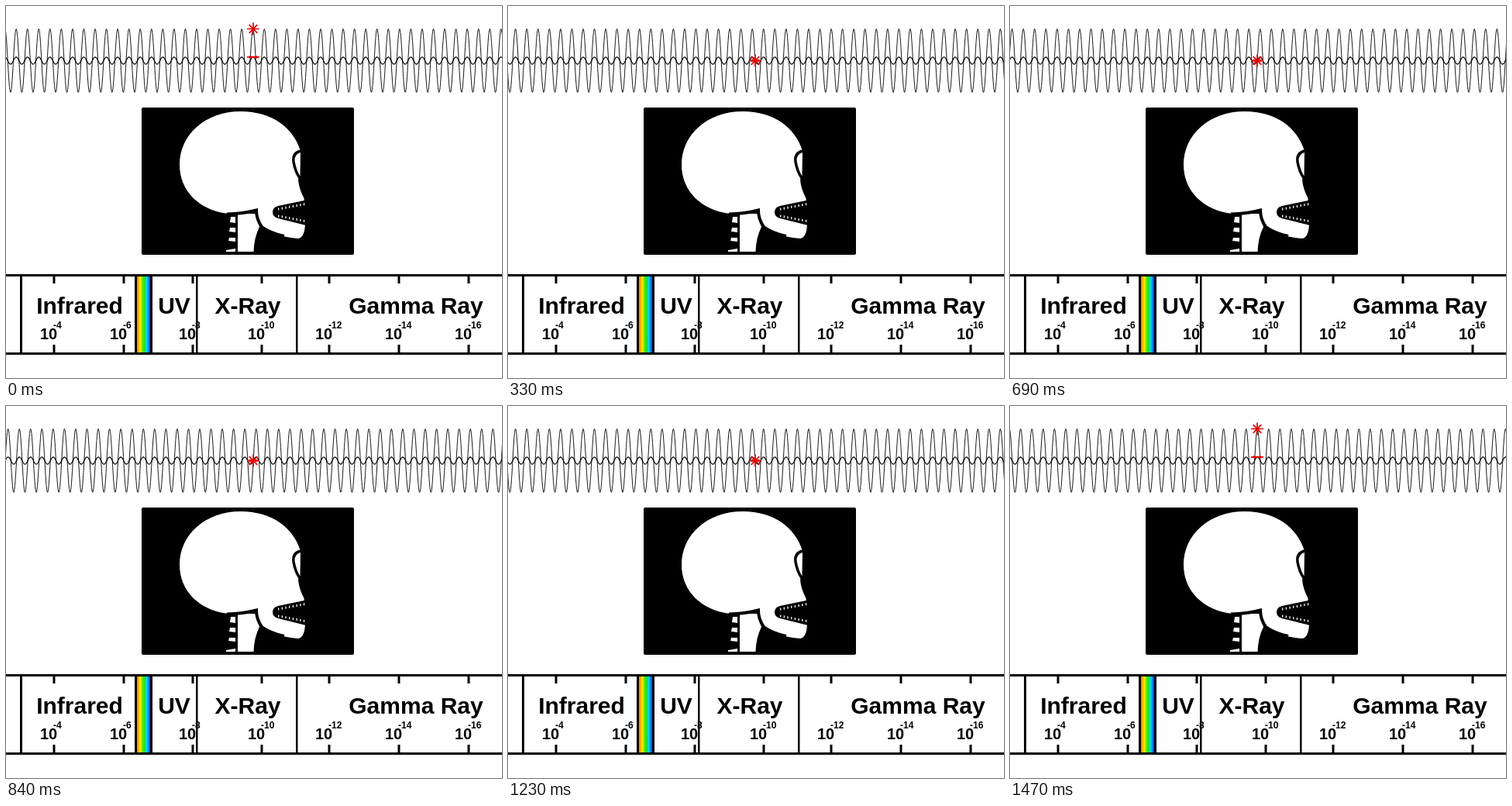
An HTML page with a canvas that plays this animation: 640x480 px, repeating every 1500 ms.

```html
<!DOCTYPE html>
<html lang="en">
<head>
<meta charset="utf-8">
<title>Electromagnetic spectrum</title>
<style>
  html, body { margin: 0; width: 100%; height: 100%; overflow: hidden; background: #fff; }
  canvas { display: block; }
</style>
</head>
<body>
<canvas id="stage" width="640" height="480"></canvas>
<script>
const ctx = document.getElementById('stage').getContext('2d');

const STEP_MS = 30, POSES = 5;
const WAVE = { mid: 70.5, length: 14.55, crest: 318.7, drift: 3.5, marker: 319 };
const TALL = 41, SHORT = 4.6;

function rect(x, y, w, h, color = '#000') {
  ctx.fillStyle = color;
  ctx.fillRect(x, y, w, h);
}

function shape(path, color) {
  ctx.fillStyle = color;
  ctx.fill(new Path2D(path));
}

function line(path, width, color = '#000') {
  ctx.strokeStyle = color;
  ctx.lineWidth = width;
  ctx.stroke(new Path2D(path));
}

function text(str, x, y, size, align = 'left') {
  ctx.font = `bold ${size}px "Liberation Sans", Arial, sans-serif`;
  ctx.textAlign = align;
  ctx.fillStyle = '#000';
  ctx.fillText(str, x, y);
}

function drawWave(amplitude, shift, width) {
  ctx.beginPath();
  for (let x = -1; x <= 641; x += 0.5) {
    const angle = 2 * Math.PI * (x - WAVE.crest - shift) / WAVE.length;
    ctx.lineTo(x, WAVE.mid - amplitude * Math.cos(angle));
  }
  ctx.strokeStyle = '#000';
  ctx.lineWidth = width;
  ctx.stroke();
}

function drawStar(y, squash) {
  ctx.beginPath();
  for (let i = 0; i < 4; i++) {
    const angle = i * Math.PI / 4;
    const r = i % 2 ? 7.5 : 8;
    const dx = r * Math.cos(angle), dy = r * squash * Math.sin(angle);
    ctx.moveTo(WAVE.marker - dx, y - dy);
    ctx.lineTo(WAVE.marker + dx, y + dy);
  }
  ctx.strokeStyle = '#e60000';
  ctx.lineWidth = 1.7;
  ctx.stroke();
}

function drawTeeth() {
  for (let i = 0; i < 8; i++) {
    const x = 351 + i * 4.7;
    const upper = 260.5 - i * 0.9, lower = 269.5 + i * 0.9;
    rect(x, upper, 1.3, 3, '#fff');
    rect(x, lower, 1.3, 3, '#fff');
  }
}

function drawSkull() {
  ctx.fillStyle = '#000';
  ctx.beginPath();
  ctx.roundRect(175, 131, 274, 190, 2);
  ctx.fill();

  // neck and vertebrae
  shape('M299 268 H322 Q325 278 327 285 Q320 299 319.5 317 H299 Z', '#fff');
  shape('M290 272 H296 V280 L289 279 Z M289 286 H296 V292 L288 291 Z' +
        'M288 299 H296 V304 L287 303 Z M284 315 L296 313 V317 H284 Z', '#fff');

  // cranium, face and jaw
  shape('M303 136 C343 136 371 157 380 187 L379.5 219 L377 224' +
        'Q378 236 384.5 248 L386 282 Q385 299 377 300' +
        'Q345 297 331 286 Q324 275 322 264 Q305 269 287 268' +
        'C249 264 224 238 224 205 C224 166 257 136 303 136 Z', '#fff');
  line('M285 268.5 Q306 268 323 263.5 Q323 275 330 285 Q341 293 359 297', 4);

  // eye socket
  line('M380 187 C373 189 370 194 371 201 Q373 213 379 222', 3.5);

  shape('M387 250.5 L351 258 Q344 260 344 266 Q344 272 351 274 L387 283 Z', '#000');
  drawTeeth();
}

function drawSpectrum() {
  const rainbow = ctx.createLinearGradient(168, 0, 187, 0);
  ['#ff5a00', '#ffa500', '#ffee00', '#55e800', '#20dc30', '#00dce8', '#0070ff', '#0020d0']
    .forEach((color, i, all) => rainbow.addColorStop(i / (all.length - 1), color));
  rect(168, 348, 19, 100, rainbow);

  rect(0, 346, 640, 3);
  rect(0, 447, 640, 3);
  for (const x of [18, 166, 186, 245, 374]) rect(x, 347, x < 200 ? 3 : 2.5, 102);

  text('Infrared', 95, 397, 30, 'center');
  text('UV', 217, 397, 30, 'center');
  text('X-Ray', 312, 397, 30, 'center');
  text('Gamma Ray', 529, 397, 30, 'center');

  [62, 152, 241, 330, 417, 507, 597].forEach((x, i) => {
    rect(x - 1.5, 348, 3, 10);
    rect(x - 1.5, 437, 3, 11);
    text('10', x - 18, 430, 20);
    text(`-${4 + 2 * i}`, x - 1, 416, 12);
  });
}

function draw(now) {
  const pose = Math.floor(now / STEP_MS) % POSES;
  const shift = -pose * WAVE.drift;
  const height = Math.cos(pose * Math.PI / 2);

  rect(0, 0, 640, 480, '#fff');
  drawWave(TALL, shift, 0.9);
  drawWave(SHORT, shift, 1.2);
  drawStar(WAVE.mid - TALL * height, 1);
  drawStar(WAVE.mid - SHORT * height, 0.15);
  drawSkull();
  drawSpectrum();
}

let start;
function tick(now) {
  start ??= now;
  draw(now - start);
  requestAnimationFrame(tick);
}
draw(0);
requestAnimationFrame(tick);
</script>
</body>
</html>
```
